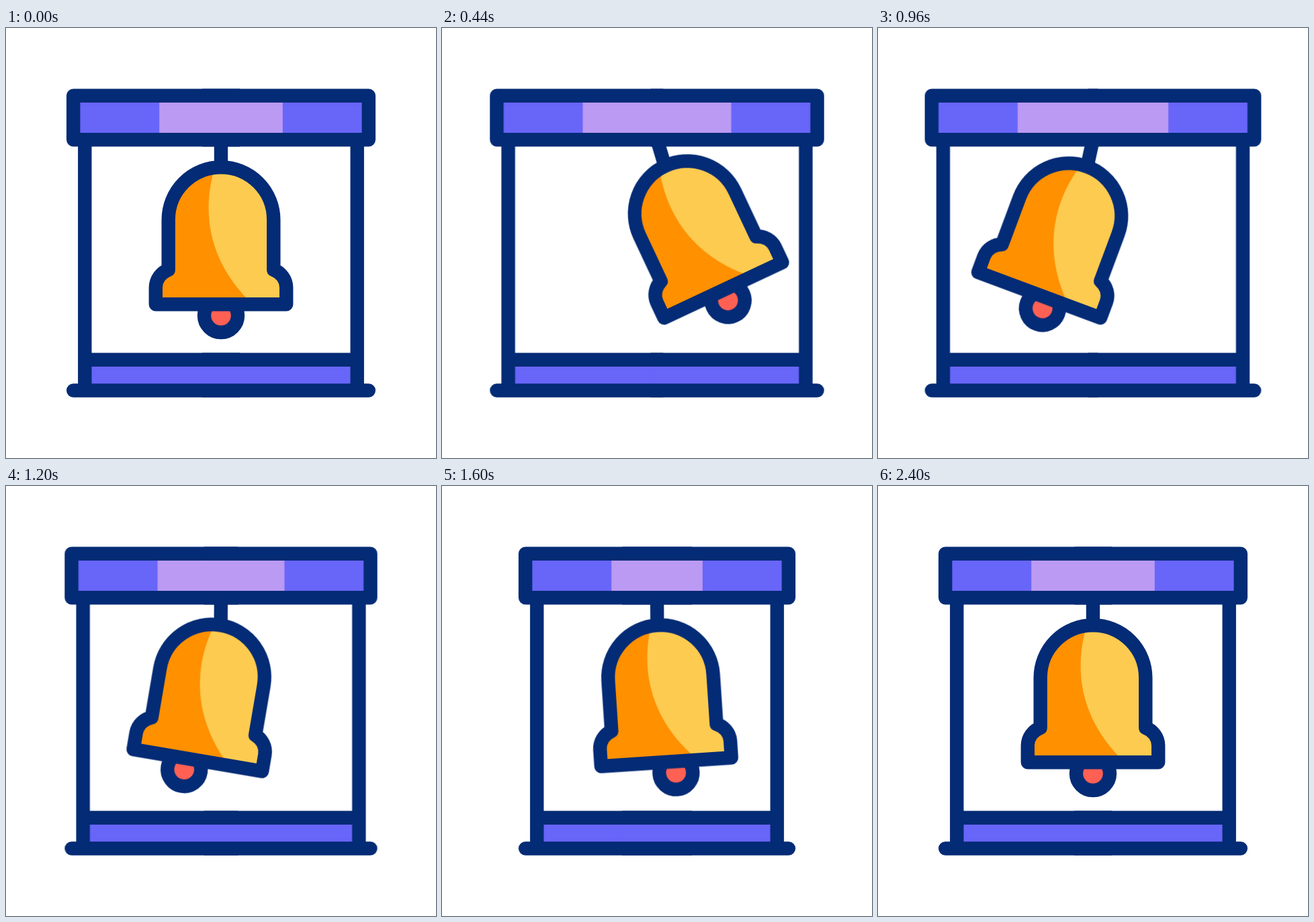
Write an HTML page without scripts that moves like this. It is 640 by 640 pixels and loops after 3 s.

```html
<!DOCTYPE html>
<html lang="en">
<head>
<meta charset="utf-8">
<title>Swinging bell</title>
<style>
  html, body { margin: 0; width: 100%; height: 100%; overflow: hidden; background: #fff; }
  svg { display: block; width: 100%; height: 100%; }

  .line { fill: none; stroke: #042b75; stroke-width: 20.4; stroke-linejoin: round; }
  .purple { fill: #6865f9; }
  .lilac { fill: #bb9af3; }
  .orange { fill: #ff9000; }
  .yellow { fill: #fdcb50; }
  .red { fill: #ff6054; }

  .side, .rod, .bell, .clapper {
    animation: 3s cubic-bezier(.5, 0, .5, 1) infinite;
  }
  .side { animation-name: stretch; }
  .rod { animation-name: swing; transform-origin: 320px 166px; }
  .bell { animation-name: follow; transform-origin: 320px 207px; }
  .clapper { animation-name: slide; }

  @keyframes stretch {
    0%, 80%, 100% { transform: translateX(0); }
    23.5% { transform: translateX(-25.5px); }
    58.4% { transform: translateX(25.5px); }
  }
  @keyframes swing {
    0%, 80%, 100% { transform: rotate(0deg); }
    16.7% { transform: rotate(-17deg); }
    32.3% { transform: rotate(12.2deg); }
    46% { transform: rotate(-6.5deg); }
    60% { transform: rotate(4.5deg); }
    68.7% { transform: rotate(-2deg); }
  }
  @keyframes follow {
    0%, 2.7%, 80%, 100% { transform: rotate(0deg); }
    22% { transform: rotate(-11.7deg); }
    36% { transform: rotate(11.5deg); }
    50% { transform: rotate(-4.3deg); }
    62.7% { transform: rotate(3.4deg); }
    72% { transform: rotate(-1deg); }
  }
  @keyframes slide {
    0%, 14.7%, 80%, 100% { transform: translateX(0); }
    26% { transform: translateX(28px); }
    40% { transform: translateX(-17.5px); }
    52.7% { transform: translateX(13.5px); }
    65.3% { transform: translateX(-1px); }
  }
</style>
</head>
<body>
<svg viewBox="0 0 640 640">
  <defs>
    <!-- each half reaches past the middle so the stretching leaves no gap -->
    <g id="half">
      <path class="purple" d="M100.2 100.7H230V166.300H100.2zM117.3 493.8H348V539.5H117.3z"/>
      <path class="lilac" d="M228.2 100.7H348V166.3H228.2z"/>
      <path class="line" d="M348 100.7H100.2V166.3H348M117.3 166.3V539.5M117.3 493.8H348"/>
      <path class="line" d="M348 539.5H100.2H110" />
    </g>
    <path id="shell" d="M320 207.2A78.3 78.3 0 0 1 398.3 285.5V360A28 28 0 0 1 417.2 386V411.3H222.8V386A28 28 0 0 1 241.7 360V285.5A78.3 78.3 0 0 1 320 207.2z"/>
    <clipPath id="inside"><use href="#shell"/></clipPath>
  </defs>

  <g class="side"><use href="#half"/></g>
  <g transform="matrix(-1 0 0 1 640 0)">
    <g class="side"><use href="#half"/></g>
  </g>

  <g class="rod">
    <path class="line" d="M320 166V207"/>
    <g class="bell">
      <g class="clapper">
        <circle class="red" cx="320" cy="428" r="25"/>
        <circle class="line" cx="320" cy="428" r="25"/>
      </g>
      <use href="#shell" class="orange"/>
      <path class="yellow" clip-path="url(#inside)" d="M311 207C290 275 302 350 368 412H420V207z"/>
      <use href="#shell" class="line"/>
    </g>
  </g>
</svg>
</body>
</html>
```
